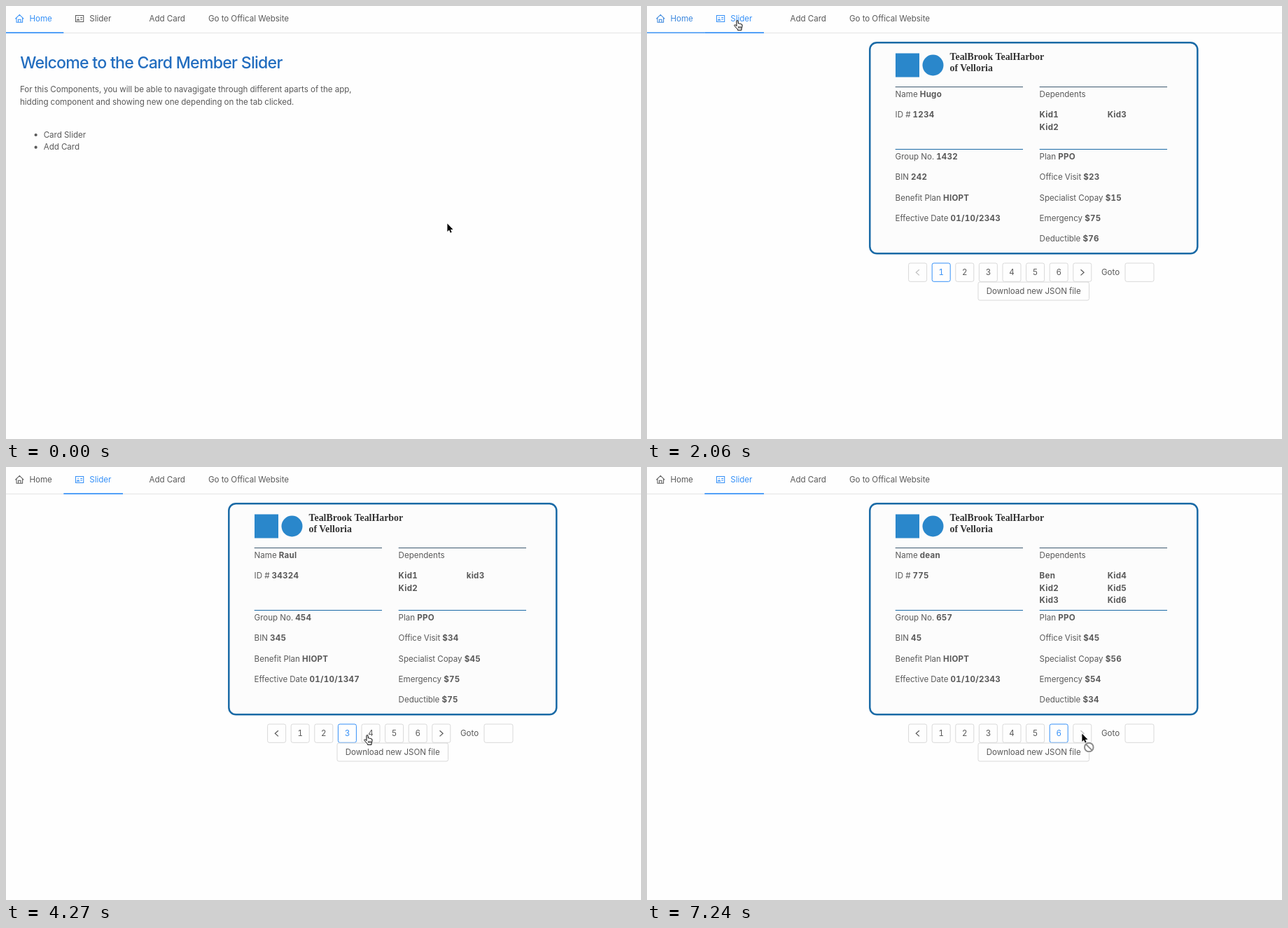
Animation of 907x618 px, one loop 7.99 s. Source, as an HTML page:

```html
<!DOCTYPE html>
<html lang="en">
<head>
<meta charset="utf-8">
<title>Card slider</title>
<style>
  html, body { margin: 0; width: 100%; height: 100%; overflow: hidden; background: #fefefe; }
  svg { display: block; width: 907px; height: 618px; }
  text {
    font: 11.56px Inter, sans-serif; font-optical-sizing: none; font-variant-numeric: tabular-nums;
    fill: #595959; white-space: pre;
  }
  .bold { font-weight: 700; letter-spacing: .28px; }
  .title { font-size: 23.1px; font-weight: 500; letter-spacing: -.74px; fill: #226dbf; }
  .brand { font: bold 13.9px "Liberation Serif", serif; fill: #333; }
  .mid { text-anchor: middle; }
  .box { fill: #fefefe; stroke: #d9d9d9; }
  .icon { fill: none; stroke-width: 1.05; }
  .chevron { fill: none; stroke-width: 1.2; }
</style>
</head>
<body>
<svg id="stage" viewBox="0 0 907 618">
  <path d="M0 38.5H907" stroke="#e4e4e4"/>
  <g id="nav"></g>
  <g id="home"></g>
  <g id="slider"></g>
  <g id="cursor">
    <g id="arrow" transform="translate(-.6 .6) scale(.9)">
      <path d="M0 0V12.6L2.9 9.9 4.9 14.5 6.9 13.6 5 9.2H9Z" stroke="#fff" stroke-width="1.6" paint-order="stroke"/>
    </g>
    <g id="hand" stroke="#000" stroke-linejoin="round">
      <path fill="#fff" d="M4 8.6 3.9 1.8Q3.9 .6 5 .6 6 .6 6.1 1.8L6.4 5Q7.4 4.4 8.2 5.4 9.4 4.8 10 5.9 11.6 5.4 12 7 12.3 10 11 12V14.4H5.4V13.2Q3.6 11.4 1.2 8.6 .2 7.2 1.4 6.8 2.4 6.6 4 8.6Z"/>
      <path stroke-width=".8" d="M6.6 9V12M8.3 9V12M10 9V12"/>
    </g>
    <g id="denied" fill="#fff" stroke="#8c8c8c" stroke-width="2">
      <circle cx="9.3" cy="20" r="8" stroke="none"/>
      <circle cx="9.3" cy="20" r="6.3"/>
      <path d="M4.9 15.6 13.7 24.4"/>
    </g>
  </g>
</svg>
<script>
const LOOP = 7990, FADE = 300;
const BLUE = '#3590f7', GREY = '#595959', BORDER = '#d9d9d9', CARD_BLUE = '#1a6aa6';
const $ = id => document.getElementById(id);

function add(parent, tag, attrs, content = '') {
  const node = document.createElementNS('http://www.w3.org/2000/svg', tag);
  for (const key in attrs) node.setAttribute(key, attrs[key]);
  node.textContent = content;
  return parent.appendChild(node);
}
const label = (parent, x, y, content, cls = '') => add(parent, 'text', { x, y, class: cls }, content);
const line = (parent, d, stroke, cls = '') => add(parent, 'path', { d, stroke, class: cls });

// Navigation
const nav = $('nav');
const homeTab = {
  text: label(nav, 33.5, 22, 'Home'),
  icon: line(nav, 'M13.3 18.4 19.3 12.4 25.3 18.4M15 17V23.2H23.6V17M17.6 23V19.2H21V23', GREY, 'icon'),
  bar: add(nav, 'rect', { y: 37.3, width: 82.3, height: 1.7, fill: BLUE })
};
const sliderTab = {
  text: label(nav, 119.3, 22, 'Slider'),
  icon: line(nav, 'M99.5 13.4H110.7V22.4H99.5ZM101.4 20.3Q103 17.2 104.6 20.3ZM102.2 16.2H103.8M106.2 16.5H109M106.2 19H109', GREY, 'icon'),
  bar: add(nav, 'rect', { x: 82.3, y: 37.3, width: 84.7, height: 1.7, fill: BLUE })
};
label(nav, 204.5, 22, 'Add Card');
label(nav, 289, 22, 'Go to Offical Website');

// Home view
const home = $('home');
label(home, 20.3, 88.5, 'Welcome to the Card Member Slider', 'title');
label(home, 20, 123, 'For this Components, you will be able to navagigate through different aparts of the app,');
label(home, 20, 140.6, 'hidding component and showing new one depending on the tab clicked.');
['Card Slider', 'Add Card'].forEach((item, i) => {
  const y = 187.6 + i * 17.7;
  add(home, 'circle', { cx: 42.6, cy: y - 3.6, r: 2.1, fill: GREY });
  label(home, 53.7, y, item);
});

// Card
const view = $('slider');
add(view, 'rect', { x: 318.3, y: 52.2, width: 468, height: 301, rx: 10, fill: '#fcfcfc', stroke: CARD_BLUE, 'stroke-width': 2.5 });
add(view, 'rect', { x: 355, y: 67.5, width: 34, height: 34, fill: '#2a87cb' });
add(view, 'circle', { cx: 408.5, cy: 84.5, r: 15, fill: '#2a87cb' });
label(view, 432.5, 77, 'TealBrook TealHarbor', 'brand');
label(view, 432.5, 93, 'of Velloria', 'brand');
line(view, 'M354.7 115.5H537M560.7 115.5H743', '#3d5a70');
line(view, 'M354.7 204.5H537M560.7 204.5H743', CARD_BLUE);
label(view, 560.6, 129.5, 'Dependents');

function field(x, y, caption, value = '') {
  const text = label(view, x, y, '');
  add(text, 'tspan', {}, caption + ' ');
  return add(text, 'tspan', { class: 'bold' }, value);
}
field(354.6, 277.6, 'Benefit Plan', 'HIOPT');
field(560.6, 218.7, 'Plan', 'PPO');
const fields = [
  [354.6, 129.5, 'Name'], [354.6, 159, 'ID #'], [354.6, 218.7, 'Group No.'],
  [354.6, 248.1, 'BIN'], [354.6, 307, 'Effective Date'], [560.6, 248.1, 'Office Visit'],
  [560.6, 277.6, 'Specialist Copay'], [560.6, 307, 'Emergency'], [560.6, 336.4, 'Deductible']
].map(args => field(...args));
const dependents = [0, 1, 2, 3, 4, 5].map(i =>
  label(view, i < 3 ? 560.6 : 657.7, 159 + i % 3 * 17.6, '', 'bold'));

const second = ['34324', '454', '345', '01/10/1347', '$34', '$45', '$75', '$75'];
const third = ['775', '657', '45', '01/10/2343', '$45', '$56', '$54', '$34'];
const family = ['Ben', 'Kid2', 'Kid3', 'Kid4', 'Kid5', 'Kid6'];
const cards = [
  { values: ['Hugo', '1234', '1432', '242', '01/10/2343', '$23', '$15', '$75', '$76'], kids: ['Kid1', 'Kid2', '', 'Kid3'] },
  { values: ['Luis', ...second], kids: ['Kid1', 'Kid2', '', 'kid3'] },
  { values: ['Raul', ...second], kids: ['Kid1', 'Kid2', '', 'kid3'] },
  { values: ['Amir', ...third], kids: family.slice(0, 3) },
  { values: ['Omar', ...third], kids: family },
  { values: ['dean', ...third], kids: family }
];

// Pagination
const box = (x, y, width, height) => add(view, 'rect', { x, y, width, height, rx: 2.5, class: 'box' });
const slotX = i => 386.6 + i * 33.6;
const slot = i => box(slotX(i) - 13, 367, 26, 26.3);
function chevron(i, dir) {
  slot(i);
  const x = slotX(i);
  return line(view, `M${x - 2.3 * dir} 376.2L${x + 2.3 * dir} 380.3L${x - 2.3 * dir} 384.4`, GREY, 'chevron');
}
const prev = chevron(0, -1), next = chevron(7, 1);
const buttons = cards.map((_, i) => ({
  box: slot(i + 1),
  text: label(view, slotX(i + 1), 384.4, i + 1, 'mid')
}));
label(view, 649, 384.3, 'Goto');
box(683, 367, 41, 26.3);
const download = { box: box(473, 394, 158.5, 26), text: label(view, 552.2, 411.3, 'Download new JSON file', 'mid') };

// Timeline: the picture changes only at evenly spaced steps inside these spans [from, to, steps]
const spans = [
  [140, 1030, 7], [1320, 1610, 3], [2060, 3090, 8], [3230, 4270, 8], [4420, 4570, 2],
  [4860, 5160, 3], [5460, 6060, 5], [6500, 6800, 3], [7090, 7240, 2]
];
const steps = spans.flatMap(([from, to, n]) =>
  Array.from({ length: n }, (_, i) => Math.floor((from + (to - from) * i / (n - 1)) / 10) * 10));
const hoverAt = [-FADE, 3150, 3750, 4300, 5460, 5700];
const clickAt = [0, 3380, 3970, 4860, 5760, 6500];
const path = [
  [0, 631, 310, 'arrow'], [140, 625, 306, 'arrow'], [290, 590, 270, 'arrow'], [440, 480, 190, 'arrow'],
  [590, 340, 110, 'arrow'], [740, 220, 55, 'arrow'], [880, 150, 22, 'arrow'], [1030, 129, 15, 'arrow'],
  [1320, 124, 20, 'hand'], [2350, 124, 20, 'hand'], [2490, 175, 144, 'arrow'], [2640, 232, 255, 'arrow'],
  [2790, 385, 397, 'arrow'], [2940, 478, 402, 'hand'], [3090, 452, 389, 'hand'], [3230, 449, 384, 'hand'],
  [3520, 449, 384, 'hand'], [3820, 482, 383, 'hand'], [4120, 482, 383, 'hand'], [4270, 511, 382, 'hand'],
  [4420, 516, 382, 'hand'], [5160, 516, 382, 'hand'], [5460, 542, 382, 'hand'], [5610, 550, 382, 'hand'],
  [5760, 550, 382, 'hand'], [6060, 583, 381, 'hand'], [6500, 583, 381, 'hand'], [6650, 602, 381, 'arrow'],
  [6800, 627, 381, 'denied'], [7090, 624, 380, 'denied'], [7240, 622, 380, 'denied']
];

const fade = (t, start) => Math.min(1, Math.max(0, (t - start) / FADE));
const mix = (from, to, k) => `color-mix(in srgb, ${to} ${k * 100}%, ${from})`;

function paintTab(tab, level) {
  tab.text.style.fill = tab.icon.style.stroke = mix(GREY, BLUE, level);
  tab.bar.style.opacity = level;
}
function paintButton(button, level) {
  button.box.style.stroke = mix(BORDER, BLUE, level);
  button.text.style.fill = mix(GREY, BLUE, level);
}
function placeCursor(t) {
  const i = path.findLastIndex(key => key[0] <= t);
  const [t0, x0, y0, kind] = path[i];
  const [t1, x1, y1] = path[i + 1] || [LOOP, x0, y0];
  const k = (t - t0) / (t1 - t0);
  $('cursor').setAttribute('transform', `translate(${x0 + (x1 - x0) * k} ${y0 + (y1 - y0) * k})`);
  const show = (id, on) => $(id).style.display = on ? '' : 'none';
  show('hand', kind === 'hand');
  show('arrow', kind !== 'hand');
  show('denied', kind === 'denied');
}

function render(time) {
  const t = steps.findLast(step => step <= time) ?? 0;
  const onSlider = t >= 2060;
  home.style.display = onSlider ? 'none' : '';
  view.style.display = onSlider ? '' : 'none';
  paintTab(homeTab, 1 - fade(t, 2010));
  paintTab(sliderTab, fade(t, 1250));

  const page = clickAt.findLastIndex(click => click <= t);
  const { values, kids } = cards[page];
  fields.forEach((node, i) => node.textContent = values[i]);
  dependents.forEach((node, i) => node.textContent = kids[i] || '');
  buttons.forEach((button, i) =>
    paintButton(button, fade(t, hoverAt[i]) * (1 - fade(t, clickAt[i + 1] ?? LOOP))));
  paintButton(download, fade(t, 2900) * (1 - fade(t, 3000)));
  prev.style.stroke = page === 0 ? '#bfbfbf' : GREY;
  next.style.stroke = page === cards.length - 1 ? '#bfbfbf' : GREY;
  placeCursor(t);
}

function tick() {
  render(performance.now() % LOOP);
  requestAnimationFrame(tick);
}
tick();
</script>
</body>
</html>
```
